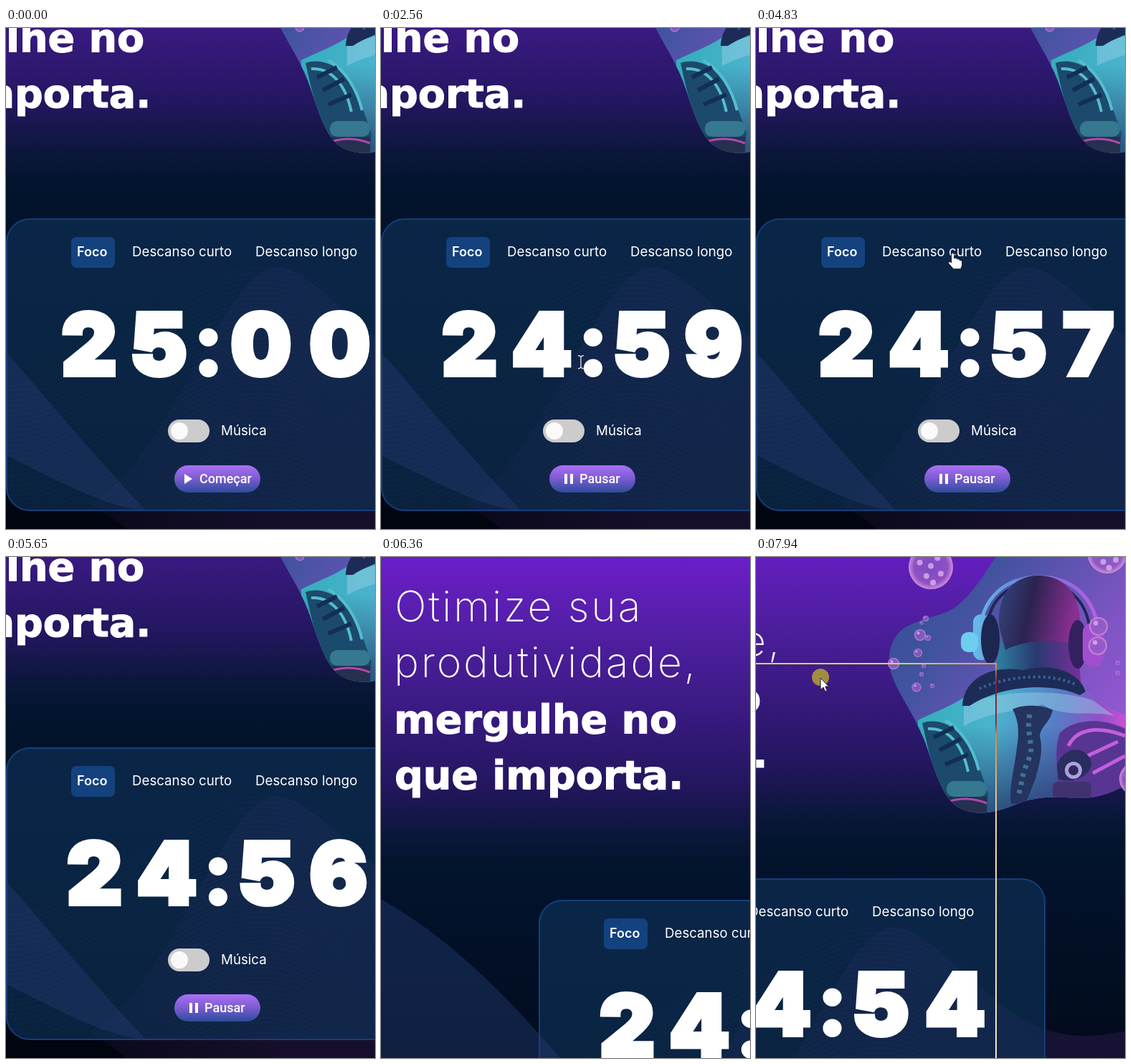
Write an HTML page that moves like this. It is 515 px wide and 700 px high and loops after 8 s.

```html
<!DOCTYPE html>
<html lang="pt-BR">
<head>
<meta charset="utf-8">
<title>Foco</title>
<style>
  html, body { margin: 0; width: 100%; height: 100%; overflow: hidden; background: #02112a; }
  svg { display: block; width: 515px; height: 700px; }
  text { fill: #fff; font-family: Inter, "Open Sans", sans-serif; }
  .thin { font-size: 59px; font-weight: 200; letter-spacing: 2.8px; }
  .bold { font: 700 55.5px "DejaVu Sans", sans-serif; stroke: #fff; stroke-width: 1.2px; }
  .label { font-size: 18.7px; }
  .button { font: 500 18px Roboto, "Liberation Sans", sans-serif; }
  .clock text { font-size: 120px; font-weight: 900; text-anchor: middle; stroke: #fff; stroke-width: 6px; }
  .clock .colon { font-family: Lato, Inter, sans-serif; font-size: 126px; stroke-width: 4px; }
</style>
</head>
<body>
<svg viewBox="0 0 515 700" xmlns="http://www.w3.org/2000/svg">
  <defs>
    <linearGradient id="sky" gradientUnits="userSpaceOnUse" x1="0" y1="-213" x2="0" y2="700">
      <stop offset="0" stop-color="#6c1dca"/>
      <stop offset=".11" stop-color="#521fa5"/>
      <stop offset=".233" stop-color="#3a1a82"/>
      <stop offset=".35" stop-color="#23165e"/>
      <stop offset=".43" stop-color="#0a1739"/>
      <stop offset=".47" stop-color="#03142e"/>
      <stop offset=".6" stop-color="#021027"/>
      <stop offset="1" stop-color="#01050f"/>
    </linearGradient>
    <linearGradient id="haze" gradientUnits="userSpaceOnUse" x1="130" y1="0" x2="380" y2="0">
      <stop offset="0" stop-color="#3f2060" stop-opacity=".15"/>
      <stop offset="1" stop-color="#3f2060" stop-opacity=".34"/>
    </linearGradient>
    <linearGradient id="pill" x1="0" y1="0" x2="0" y2="1">
      <stop offset="0" stop-color="#ac70f5"/>
      <stop offset=".5" stop-color="#7a5bd0"/>
      <stop offset="1" stop-color="#2b4d9b"/>
    </linearGradient>
    <linearGradient id="wall" x1="0" y1="0" x2="1" y2=".7">
      <stop offset="0" stop-color="#2b4f92"/>
      <stop offset=".3" stop-color="#41539f"/>
      <stop offset=".65" stop-color="#8054c4"/>
      <stop offset="1" stop-color="#a35be0"/>
    </linearGradient>
    <linearGradient id="coat" gradientUnits="userSpaceOnUse" x1="230" y1="230" x2="520" y2="260">
      <stop offset="0" stop-color="#35aebd"/>
      <stop offset=".35" stop-color="#4cb3cf"/>
      <stop offset=".65" stop-color="#557cc5"/>
      <stop offset=".85" stop-color="#9350c8"/>
      <stop offset="1" stop-color="#d052d8"/>
    </linearGradient>
    <linearGradient id="shade" gradientUnits="userSpaceOnUse" x1="0" y1="235" x2="0" y2="350">
      <stop offset="0" stop-color="#1a2858" stop-opacity="0"/>
      <stop offset="1" stop-color="#1a2858" stop-opacity=".65"/>
    </linearGradient>
    <linearGradient id="hair" x1="0" y1="0" x2="1" y2=".2">
      <stop offset="0" stop-color="#35467f"/>
      <stop offset=".45" stop-color="#2b2350"/>
      <stop offset="1" stop-color="#8a2f92"/>
    </linearGradient>
    <linearGradient id="neck" x1="0" y1="0" x2="1" y2="0">
      <stop offset="0" stop-color="#2f8fa8"/>
      <stop offset=".5" stop-color="#283a70"/>
      <stop offset="1" stop-color="#7a2f9c"/>
    </linearGradient>
    <linearGradient id="gear" gradientUnits="userSpaceOnUse" x1="290" y1="0" x2="490" y2="0">
      <stop offset="0" stop-color="#65c5ec"/>
      <stop offset=".5" stop-color="#6b75d2"/>
      <stop offset="1" stop-color="#c45be6"/>
    </linearGradient>
    <radialGradient id="drop" cx=".5" cy=".5" r=".5">
      <stop offset="0" stop-color="#8a5cc8" stop-opacity=".75"/>
      <stop offset=".75" stop-color="#9a5cc6" stop-opacity=".8"/>
      <stop offset="1" stop-color="#d596de" stop-opacity=".95"/>
    </radialGradient>
    <linearGradient id="edgeX" gradientUnits="userSpaceOnUse" x1="180" y1="0" x2="515" y2="0">
      <stop offset="0" stop-color="#c9dc62"/>
      <stop offset=".55" stop-color="#d9d75e"/>
      <stop offset="1" stop-color="#d89d50"/>
    </linearGradient>
    <linearGradient id="edgeY" gradientUnits="userSpaceOnUse" x1="0" y1="0" x2="0" y2="551">
      <stop offset="0" stop-color="#d89d50"/>
      <stop offset=".05" stop-color="#7c2038"/>
      <stop offset=".15" stop-color="#8a3038"/>
      <stop offset=".18" stop-color="#cf8848"/>
      <stop offset=".4" stop-color="#f0d6a4"/>
      <stop offset="1" stop-color="#f7e7cc"/>
    </linearGradient>
    <clipPath id="cardClip"><rect x="1" y="267" width="588" height="407" rx="32"/></clipPath>
    <clipPath id="photoClip">
      <path d="M360 -40C345 -15 335 0 329 8C310 38 290 66 268 76C245 86 215 90 200 105C186 120 183 142 188 160C196 190 226 225 240 270C254 312 264 342 287 352C312 363 336 356 362 346C392 333 420 335 450 337C480 338 500 326 515 320L700 280V-40Z"/>
    </clipPath>
  </defs>

  <g id="page">
    <rect x="-400" y="-400" width="1300" height="1400" fill="url(#sky)"/>
    <path d="M168 700C150 684 130 674 118 664C230 600 300 345 375 334C440 330 520 484 640 486C700 486 730 470 800 450V900H168Z" fill="url(#haze)"/>
    <rect x="1" y="267" width="588" height="407" rx="32" fill="#0f3259" fill-opacity=".62"/>
    <path d="M-400 190C-330 205 -270 235 -220 265C-120 322 -45 400 30 487C85 552 140 615 195 674C140 670 80 636 2 598C-80 558 -150 530 -400 470Z" fill="#243a70" fill-opacity=".43"/>
    <g id="waves" clip-path="url(#cardClip)" fill="none" stroke="#4d62a6" stroke-opacity=".09"/>
    <rect x="1" y="267" width="588" height="407" rx="32" fill="none" stroke="#153f7c" stroke-width="2"/>

    <text class="thin" x="-201" y="-123">Otimize sua</text>
    <text class="thin" x="-202" y="-45">produtividade,</text>
    <text class="bold" x="-202" y="33">mergulhe no</text>
    <text class="bold" x="-201" y="111">que importa.</text>

    <g transform="translate(186 -183)">
      <g clip-path="url(#photoClip)">
        <rect x="180" y="-40" width="430" height="410" fill="url(#wall)"/>
        <path d="M310 120C312 52 352 28 396 28S474 55 478 108" fill="none" stroke="url(#gear)" stroke-width="5"/>
        <path d="M322 110C322 60 350 36 396 36S466 70 466 110" fill="none" stroke="#222653" stroke-width="4"/>
        <path d="M344 110H448L455 195H325Z" fill="url(#neck)"/>
        <path d="M340 100C334 55 358 26 394 26C432 26 454 54 452 96L446 122C420 114 372 116 348 130Z" fill="url(#hair)"/>
        <rect x="303" y="80" width="23" height="64" rx="11" fill="url(#gear)"/>
        <rect x="286" y="105" width="24" height="28" rx="10" fill="#6fcdf0"/>
        <ellipse cx="327" cy="115" rx="13" ry="35" fill="#1c2750"/>
        <ellipse cx="449" cy="122" rx="13" ry="34" fill="#35205e"/>
        <rect x="456" y="92" width="29" height="61" rx="13" fill="#a14fd0"/>
        <path d="M226 228C250 216 275 208 296 192C350 172 420 170 462 186C480 206 500 218 560 235V380H226Z" fill="url(#coat)"/>
        <path d="M290 206C340 186 420 184 470 200L500 222C470 214 430 226 400 206C370 216 330 214 290 236Z" fill="#9ad0e6" fill-opacity=".45"/>
        <path d="M226 228H560V380H226Z" fill="url(#shade)"/>
        <path d="M288 208C290 168 330 151 372 158C410 148 450 158 460 188L452 193C410 174 340 180 298 208Z" fill="#1d2c57"/>
        <path d="M312 184C355 164 415 162 448 179" fill="none" stroke="#3a5f98" stroke-width="4" stroke-dasharray="3 4"/>
        <path d="M232 232C262 222 292 244 308 284L324 330L322 360H262Z" fill="#1c4a6c"/>
        <path d="M240 240C268 238 288 262 296 300M264 228C290 244 304 270 311 298" fill="none" stroke="#56bccf" stroke-width="4"/>
        <path d="M248 252L276 238M256 270L286 254M264 290L296 276" stroke="#122f57" stroke-width="6"/>
        <rect x="266" y="313" width="56" height="22" rx="10" fill="#35788f"/>
        <path d="M264 335H322V362H264Z" fill="#26304f"/>
        <path d="M262 344Q292 332 322 344" fill="none" stroke="#b547ae" stroke-width="3"/>
        <path d="M358 213C370 206 400 206 414 214C410 232 398 236 396 250C402 275 394 292 390 310L376 345H356C352 325 362 290 364 266C368 245 366 226 358 213Z" fill="#24345f"/>
        <path d="M382 220C376 250 390 262 380 284S372 315 366 334" fill="none" stroke="#41709a" stroke-width="7" stroke-dasharray="5 7"/>
        <path d="M424 246C440 228 480 222 515 240L560 300V360H418C428 318 412 280 424 246Z" fill="#583592"/>
        <path d="M436 264C446 242 474 234 515 250M458 280L505 258M470 302L515 278" fill="none" stroke="#c25fde" stroke-width="5"/>
        <path d="M420 290C430 264 460 262 468 286C470 306 440 318 422 310Z" fill="#2b2c60"/>
        <circle cx="443" cy="298" r="12" fill="#a9a0dc"/>
        <circle cx="443" cy="298" r="7" fill="#34275f"/>
        <rect x="414" y="314" width="54" height="26" rx="8" fill="#41326f"/>
      </g>
      <g id="drops"/>
    </g>

    <rect x="91" y="292" width="61" height="43" rx="7" fill="#14427f"/>
    <text x="99" y="319" font-size="18" font-weight="600">Foco</text>
    <text class="label" x="176" y="319">Descanso curto</text>
    <text class="label" x="348" y="319">Descanso longo</text>
    <g id="clock" class="clock"></g>
    <rect x="226" y="547" width="58" height="32" rx="16" fill="#ccc"/>
    <circle cx="242" cy="563" r="12" fill="#fafafa"/>
    <text class="label" x="300" y="569">Música</text>
    <rect x="235" y="611" width="120" height="38" rx="19" fill="url(#pill)"/>
    <g id="play">
      <path d="M249 623L260 630L249 637Z" fill="#fff"/>
      <text class="button" x="270" y="636">Começar</text>
    </g>
    <g id="pause">
      <path d="M256 623h4v14h-4zM264 623h4v14h-4z" fill="#fff"/>
      <text class="button" x="277" y="636">Pausar</text>
    </g>
  </g>

  <g id="frame">
    <rect x="-1" y="-1" width="517" height="2" fill="url(#edgeX)"/>
    <rect x="-1" y="699" width="517" height="2" fill="url(#edgeX)"/>
    <rect x="-1" y="0" width="2" height="700" fill="url(#edgeY)"/>
    <rect x="514" y="0" width="2" height="700" fill="url(#edgeY)"/>
  </g>
  <g id="cursor">
    <circle id="halo" cx="0" cy="-1" r="12" fill="#b3a136" fill-opacity=".85"/>
    <path id="arrow" d="M0 0V16.5L3.9 13L6.6 19L9.3 17.8L6.7 12H11.5Z" fill="#fff" stroke="#15192a"/>
    <path id="beam" d="M-4 -9Q0 -9 0 -6Q0 -9 4 -9M0 -6V6M-4 9Q0 9 0 6Q0 9 4 9" fill="none" stroke="#d9d9d9" stroke-width="1.4"/>
    <path id="hand" d="M-2 1Q0 -2 2 1V7Q5 5 6 8Q9 7 10 10Q13 9 13 13V17L11 22H1L-6 14Q-6 10 -2 13Z" fill="#fff" stroke="#15192a"/>
  </g>
</svg>
<script>
const $ = id => document.getElementById(id);
const LOOP = 8000, START = 1540;
const GRIP = [270, 20];

// The view stays still while its outline is dragged, then jumps to it on release.
// path: [time, x, y]
const drags = [
  { path: [[5760, 0, 0], [5950, -90, -80], [6360, -220, -213]], release: 6360 },
  { path: [[6400, 0, 0], [6560, 258, 12], [6630, 290, 18], [6800, 290, 18], [7140, 406, 30]], release: 7180 },
  { path: [[7570, -22, 0], [7940, -180, 149]], release: LOOP }
];
const mouse = [
  [110, 500, 720], [190, 474, 674], [420, 360, 560], [650, 236, 490], [890, 275, 535],
  [1250, 286, 638], [1760, 284, 626], [2560, 279, 467], [3390, 244, 313], [3660, 244, 311],
  [3900, 240, 316], [4060, 221, 342], [4330, 250, 582], [4680, 298, 229], [4900, 264, 354],
  [5300, 284, 12], [5320, 284, -25], [7380, 282, -25], [7390, 282, -17]
];
const ticks = [2550, 3590, 4610, 5640, 6630, 7650];
const advance = { 0: 110, 2: 96, 4: 106, 5: 100, 6: 99, 7: 94, 8: 102, 9: 99, ':': 37 };

function along(points, t) {
  const next = points.findIndex(p => p[0] > t);
  if (next === 0) return points[0].slice(1);
  if (next < 0) return points[points.length - 1].slice(1);
  const [t0, x0, y0] = points[next - 1], [t1, x1, y1] = points[next];
  const k = (t - t0) / (t1 - t0);
  return [x0 + (x1 - x0) * k, y0 + (y1 - y0) * k];
}

const show = (id, on) => $(id).setAttribute('display', on ? 'inline' : 'none');
const move = (id, x, y) => $(id).setAttribute('transform', `translate(${x.toFixed(2)} ${y.toFixed(2)})`);

let shown = '';
function setClock(value) {
  if (value === shown) return;
  shown = value;
  const chars = [...value];
  let x = 294.5 - chars.reduce((sum, c) => sum + advance[c], 0) / 2;
  $('clock').innerHTML = chars.map(c => {
    const mid = x + advance[c] / 2;
    x += advance[c];
    return `<text${c === ':' ? ' class="colon"' : ''} x="${mid}" y="484.5">${c}</text>`;
  }).join('');
}

function pointer(x, y) {
  if (x > 235 && x < 355 && y > 611 && y < 649) return 'hand';
  if (x > 165 && x < 500 && y > 295 && y < 332) return 'hand';
  return x > 70 && x < 515 && y > 390 && y < 500 ? 'beam' : 'arrow';
}

function draw(t) {
  let viewX = 0, viewY = 0;
  for (const { path, release } of drags) {
    if (t < release) continue;
    const [dx, dy] = along(path, release);
    viewX -= dx;
    viewY -= dy;
  }
  move('page', viewX, viewY);

  const past = ticks.filter(tick => t >= tick).length;
  setClock(past ? `24:${60 - past}` : '25:00');
  show('play', t < START);
  show('pause', t >= START);

  const drag = drags.find(d => t >= d.path[0][0] && t < d.release);
  let [x, y] = along(mouse, t);
  if (drag) {
    const [dx, dy] = along(drag.path, t);
    [x, y] = [GRIP[0] + dx, GRIP[1] + dy];
    move('frame', dx, dy);
  }
  show('frame', drag);
  show('halo', drag);
  move('cursor', x, y);
  const kind = drag ? 'arrow' : pointer(x, y);
  for (const id of ['arrow', 'beam', 'hand']) show(id, id === kind);
}

let waves = '';
for (let i = 0; i < 48; i++) {
  const d = i * 7;
  waves += `<path d="M0 ${500 + d}C130 ${500 + d} 230 ${335 + d} 355 ${335 + d}S520 ${470 + d} 600 ${510 + d}"/>`;
}
$('waves').innerHTML = waves;

const drops = [
  [244, 14, 31], [490, -4, 27], [229, 109, 8], [226, 134, 6], [224, 182, 6.5], [192, 149, 8],
  [237, 86, 4], [231, 92, 2.5], [240, 113, 4], [234, 152, 3], [231, 164, 3], [246, 180, 3],
  [478, 97, 13], [477, 124, 13], [505, 148, 3], [505, 162, 3], [530, 310, 23]
];
const specks = [[-.5, -.2], [-.2, .4], [.3, -.4], [.45, .3], [0, -.05], [-.35, -.6], [.1, .7]];
$('drops').innerHTML = drops.map(([x, y, r]) => {
  const spots = r > 20 ? specks : [[-.3, -.35]];
  return `<circle cx="${x}" cy="${y}" r="${r}" fill="url(#drop)"/>` + spots.map(([a, b]) =>
    `<circle cx="${x + a * r}" cy="${y + b * r}" r="${r > 20 ? 4 : r * .25}" fill="#dcb8f0" fill-opacity=".75"/>`).join('');
}).join('');

const begin = performance.now();
function loop() {
  draw((performance.now() - begin) % LOOP);
  requestAnimationFrame(loop);
}
draw(0);
requestAnimationFrame(loop);
</script>
</body>
</html>
```
